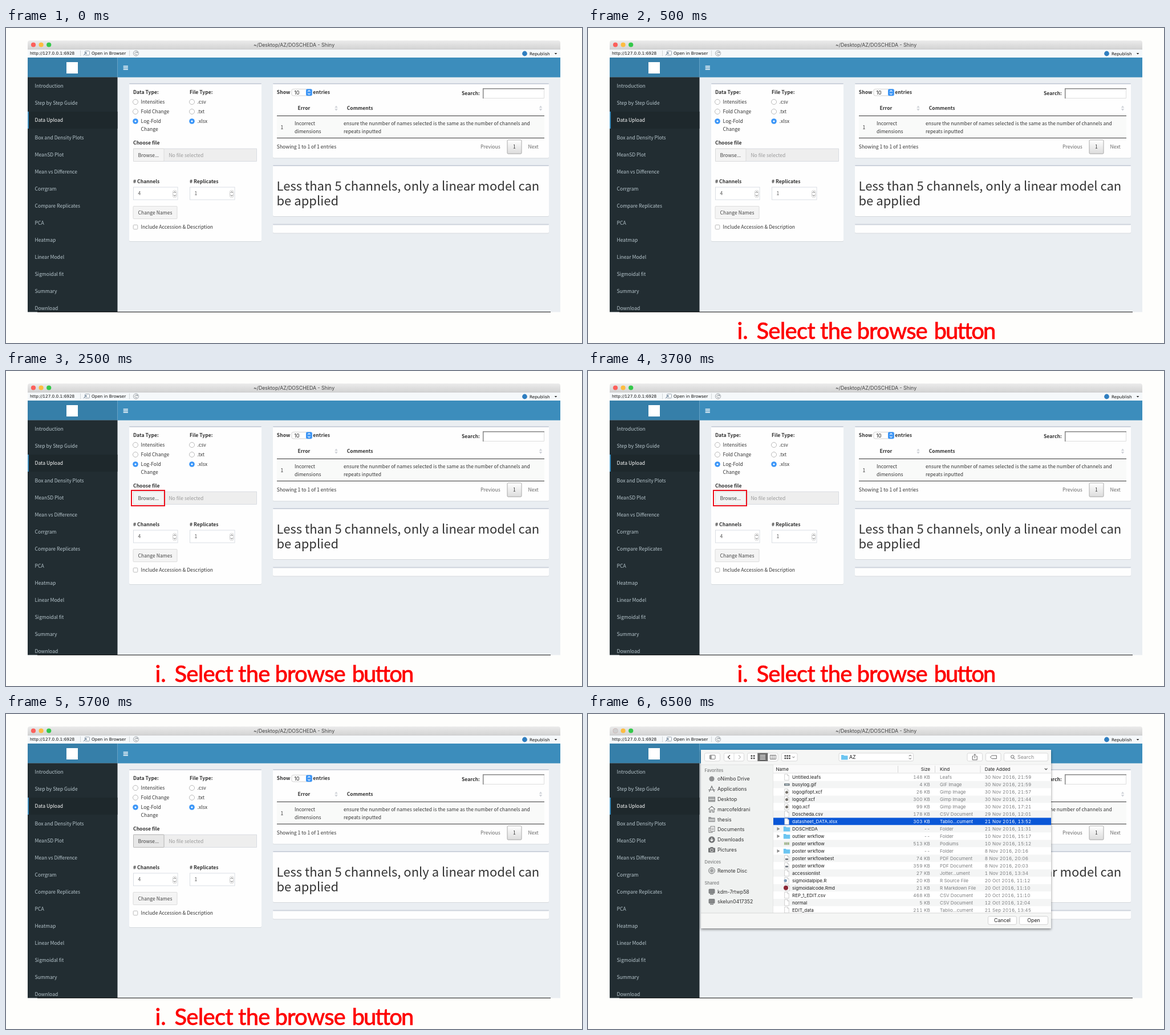
These frames come from a looping animation (1010 by 554 pixels, 8 s). An HTML page:

```html
<!DOCTYPE html>
<html lang="en">
<head>
<meta charset="utf-8">
<title>Data upload walkthrough</title>
<style>
  html, body { margin: 0; width: 100%; height: 100%; overflow: hidden; background: #fefefc; }
  svg { display: block; width: 1010px; height: 554px; }
  text { white-space: pre; }
  .page { font: 8.58px "Noto Sans CJK JP", "Noto Sans CJK SC", "Noto Sans CJK", sans-serif; fill: #333; }
  .bold { font-weight: 700; }
  .big { font-size: 22.04px; }
  .mac { font: 8.05px Inter, "Liberation Sans", sans-serif; fill: #1c1c1c; }
  .mid { font-size: 8.8px; }
  .group { font-size: 7.5px; font-weight: 500; fill: #7b7d7d; }
  .num { letter-spacing: .2px; font-variant-numeric: tabular-nums; }
  .bar { font: 7.3px "DejaVu Sans", sans-serif; fill: #111; }
  .caption { font: 500 40px Lato, sans-serif; fill: #fe0000; stroke: #fe0000; stroke-width: .5px; }
  .end { text-anchor: end; }
  .center { text-anchor: middle; }
</style>
</head>
<body>
<script>
const LOOP = 8000;

const rect = (x, y, w, h, fill, more = '') =>
  `<rect x="${x}" y="${y}" width="${w}" height="${h}" fill="${fill}" ${more}/>`;
const framed = (x, y, w, h, fill, line, r = 0) =>
  rect(x + .5, y + .5, w - 1, h - 1, fill, `stroke="${line}" stroke-width=".8" rx="${r}"`);
const circle = (x, y, r, fill, more = '') => `<circle cx="${x}" cy="${y}" r="${r}" fill="${fill}" ${more}/>`;
const fillPath = (d, fill) => `<path d="${d}" fill="${fill}"/>`;
const line = (d, color, width = 1) => `<path d="${d}" fill="none" stroke="${color}" stroke-width="${width}"/>`;
// y is the middle of the capitals
const text = (x, y, s, kind = 'page', fill = '') =>
  `<text x="${x}" y="${y}" dy=".365em" class="${kind}"${fill && ` style="fill:${fill}"`}>${s.replace(/&/g, '&amp;')}</text>`;
const bold = (x, y, s) => text(x, y, s, 'page bold');
const part = (id, body) => `<g id="${id}">${body}</g>`;

const arrows = (x, y, gap, color, w = 1) =>
  line(`M${x - 2} ${y - gap}l2 -2l2 2M${x - 2} ${y + gap}l2 2l2 -2`, color, w);

/* ---------- application window ---------- */

function titleBar() {
  const lights = ['#fc605b', '#fdbc40', '#34c84a'].map((c, i) => circle(48 + i * 13.6, 29.5, 4.1, c)).join('');
  return `<path d="M38 38V26q0-4 4-4H968q4 0 4 4V38z" fill="url(#chrome)"/>` +
    rect(38, 37, 934, 15.5, '#f5f8fa') + line('M38 37.3H972', '#b9b9b9', .7) + lights +
    text(505, 29.5, '~/Desktop/AZ/DOSCHEDA - Shiny', 'mac mid center', '#444') +
    `<g style="font-size:7.75px">${text(42, 44.5, 'http://127.0.0.1:6928', 'bar')}</g>` +
    line('M130.5 39.5V49.5M216.5 39.5V49.5', '#c9cdd0', .8) +
    framed(138, 40, 9, 8, '#fff', '#7d8c9a', 1) + line('M136 48l5-5m-3 0h3v3', '#5f7890', 1) +
    text(150, 44.5, 'Open in Browser', 'bar') +
    circle(228, 44.5, 4.6, '#fff', 'stroke="#8c949b" stroke-width=".9"') +
    line('M230.3 43.2a2.4 2.4 0 1 0 0 2.8M230.6 41.7v2h-2', '#7a858d', .9) +
    circle(909.5, 45, 4.4, '#2f7ec0') + text(918, 45, 'Republish', 'bar') +
    fillPath('M961.7 44h4.6l-2.3 2.6z', '#222');
}

function sideMenu() {
  const items = ['Introduction', 'Step by Step Guide', 'Data Upload', 'Box and Density Plots', 'MeanSD Plot',
    'Mean vs Difference', 'Corrgram', 'Compare Replicates', 'PCA', 'Heatmap', 'Linear Model',
    'Sigmoidal fit', 'Summary', 'Download'];
  return rect(38, 86.5, 157.5, 413, '#222d32') + rect(38, 147, 157.5, 30, '#1e282c') +
    rect(38, 147, 2, 30, '#3c8dbc') +
    `<g clip-path="url(#window)">` +
    items.map((s, i) => text(50.5, 102.2 + i * 30.06, s, 'page', i === 2 ? '#fff' : '#b8c7ce')).join('') + '</g>';
}

function header() {
  return rect(38, 52, 157.5, 34.7, '#367fa9') + rect(195.5, 52, 776.5, 34.7, '#3c8dbc') +
    rect(106, 60, 20, 20, '#fff') +
    line('M205.7 67.2h8.2M205.7 70h8.2M205.7 72.8h8.2', '#fff', 1.4);
}

const card = (x, y, w, h) =>
  rect(x, y + 1, w, h, '#d5d9dd', 'rx="2"') + rect(x, y, w, h, '#fefefe', 'rx="2"') +
  rect(x, y, w, 2, '#ccd2dc', 'rx="1"');

const radio = (x, y, on) => on
  ? circle(x, y, 4.8, '#3b96f8') + circle(x, y, 1.6, '#fff')
  : circle(x, y, 4.5, '#fff', 'stroke="#a9a9a9" stroke-width=".8"');

const numberBox = (x, w, value) =>
  framed(x, 279.5, w, 23, '#fff', '#d2d6de') + text(x + 8.6, 291.3, value, 'page', '#555') +
  framed(x + w - 9.5, 285, 7.5, 13.5, '#fff', '#c3c3c3', 3) + arrows(x + w - 5.7, 291.7, 1.9, '#444', .9);

function form() {
  const choice = (x, y, s, on) => radio(x, y, on) + text(x + 9.6, y, s);
  return card(216, 97, 232, 278) +
    bold(223, 113, 'Data Type:') + bold(322, 113, 'File Type:') +
    choice(227, 130, 'Intensities') + choice(227, 147, 'Fold Change') + choice(227, 164, 'Log-Fold', true) +
    text(236.6, 178, 'Change') +
    choice(326, 130, '.csv') + choice(326, 147, '.txt') + choice(326, 164, '.xlsx', true) +
    bold(223, 202, 'Choose file') +
    framed(223, 211.7, 217, 23.3, '#eeeeee', '#d2d6de') + text(285.4, 223.6, 'No file selected', 'page', '#999') +
    framed(223, 211.7, 54.5, 23.3, '#f4f4f4', '#d6d6d6', 1) +
    part('pressed', framed(223, 211.7, 54.5, 23.3, '#e7e7e7', '#adadad', 1)) +
    text(231.4, 223.6, 'Browse...', 'page', '#444') +
    bold(223, 269.5, '# Channels') + bold(322, 269.5, '# Replicates') +
    numberBox(223, 78.5, '4') + numberBox(322, 79.5, '1') +
    framed(222.5, 313, 78, 23, '#f4f4f4', '#d6d6d6', 1) + text(261.5, 324.8, 'Change Names', 'page center', '#444') +
    framed(222.7, 345.8, 8.6, 8.6, '#fff', '#a9a9a9', 1.5) + text(236.6, 350.2, 'Include Accession & Description');
}

function results() {
  const sort = x => fillPath(`M${x - 2.7} 140.3h5.4l-2.7-3.8zM${x - 2.7} 142h5.4l-2.7 3.8z`, '#d0d3d8');
  return card(468, 97, 484, 131.5) +
    bold(474.8, 113, 'Show') + framed(500.5, 107, 36.5, 12.5, '#fff', '#c6c6c6', 2.5) +
    rect(526, 107.2, 10.8, 12.1, '#3f97f6', 'rx="2.5"') + arrows(531.4, 113.3, 1.5, '#fff', 1.1) +
    text(505.5, 113.4, '10', 'mac mid') + bold(538.3, 113, 'entries') +
    bold(799, 115, 'Search:') + rect(836, 106, 108, 18, '#fff') +
    line('M836 123.5H943.5V106', '#dedede') + line('M836.7 124V106.8H944', '#858585', 1.5) +
    bold(511.5, 141, 'Error') + bold(597.7, 141, 'Comments') + sort(579) + sort(937.5) +
    rect(475, 155, 469, 38.5, '#f9faf9') + line('M475 154.5H944M475 193.5H944', '#222', .9) +
    text(481.5, 174.8, '1') + text(506, 168, 'Incorrect') + text(506, 181.7, 'dimensions') +
    text(592, 168, 'ensure the nunmber of names selected is the same as the number of channels and') +
    text(592, 181.7, 'repeats inputted') +
    text(474.8, 209, 'Showing 1 to 1 of 1 entries') +
    text(832, 209.3, 'Previous', 'page', '#666') + framed(878.5, 196.3, 26, 25.4, 'url(#button)', '#979797', 1.5) +
    text(891.5, 209.3, '1', 'page center') + text(915.5, 209.3, 'Next', 'page', '#666') +
    card(468, 241, 484, 90) +
    text(474.5, 277.6, 'Less than 5 channels, only a linear model can', 'page big') +
    text(474.5, 304.4, 'be applied', 'page big') +
    card(468, 344.5, 484, 16);
}

/* ---------- file dialog ---------- */

const folder = (x, y, fill) => fillPath(`M${x} ${y - 4}h4l1.2 1.3h6.3v7.2h-11.5z`, fill);

const sheet = (x, y) => `<path d="M${x - 3.8} ${y - 5.3}h5l2.6 2.6v8h-7.6z" fill="#fff" stroke="#b4b4b4" stroke-width=".6"/>` +
  line(`M${x + 1.2} ${y - 5.3}v2.6h2.6`, '#b4b4b4', .6);

const fileIcon = {
  doc: y => sheet(348.5, y),
  gif: y => rect(344, y - 2, 9.5, 4, '#68747a') + rect(345.5, y - .6, 6.5, 1.2, '#d5e3e8'),
  xcf: y => sheet(348.5, y) + circle(348.5, y + .5, 2.5, '#77736c'),
  dir: y => fillPath('M329.8 0v0z', 'none') + fillPath(`M331.5 ${y - 3}l5 3l-5 3z`, '#8b8b8b') + folder(342.8, y, '#6cc5f1'),
  deck: y => rect(343.5, y - 3.2, 10, 6.4, '#dfe6da') + rect(344.5, y - 2, 2, 4, '#8fae77') +
    rect(347.5, y - 2, 2, 4, '#9a9d8d') + rect(350.5, y - 2, 2, 4, '#8fae77'),
  pdf: y => sheet(348.5, y) + rect(346, y, 5, 3, '#7a8088'),
  r: y => sheet(348.5, y) + circle(346.2, y + .3, 2.7, '#7d9cbb'),
  rmd: y => sheet(349.5, y) + circle(347, y, 4, '#8b2635')
};

const files = [
  ['Untitled.leafs', '148 KB', 'Leafs', '30 Nov 2016, 21:59', 'doc'],
  ['busylog.gif', '4 KB', 'GIF Image', '30 Nov 2016, 21:59', 'gif'],
  ['logogifopt.xcf', '26 KB', 'Gimp Image', '30 Nov 2016, 21:57', 'xcf'],
  ['logogif.xcf', '300 KB', 'Gimp Image', '30 Nov 2016, 21:44', 'xcf'],
  ['logo.xcf', '99 KB', 'Gimp Image', '30 Nov 2016, 17:21', 'xcf'],
  ['Doscheda.csv', '178 KB', 'CSV Document', '29 Nov 2016, 12:01', 'doc'],
  ['datasheet_DATA.xlsx', '303 KB', 'Tablio...cument', '21 Nov 2016, 13:52', 'doc'],
  ['DOSCHEDA', '--', 'Folder', '21 Nov 2016, 11:31', 'dir'],
  ['outlier wrkflow', '--', 'Folder', '10 Nov 2016, 15:17', 'dir'],
  ['poster wrkflow', '513 KB', 'Podiums', '10 Nov 2016, 15:12', 'deck'],
  ['poster wrkflow', '--', 'Folder', '8 Nov 2016, 20:16', 'dir'],
  ['poster wrkflowbest', '74 KB', 'PDF Document', '8 Nov 2016, 20:06', 'pdf'],
  ['poster wrkflow', '359 KB', 'PDF Document', '8 Nov 2016, 20:03', 'pdf'],
  ['accessionlist', '27 KB', 'Jotter...ument', '1 Nov 2016, 13:34', 'doc'],
  ['sigmoidalpipe.R', '20 KB', 'R Source File', '20 Oct 2016, 11:12', 'r'],
  ['sigmoidalcode.Rmd', '21 KB', 'R Markdown File', '20 Oct 2016, 11:10', 'rmd'],
  ['REP_1_EDIT.csv', '468 KB', 'CSV Document', '20 Oct 2016, 11:10', 'doc'],
  ['normal', '5 KB', 'CSV Document', '12 Oct 2016, 12:04', 'doc'],
  ['EDIT_data', '211 KB', 'Micro'.slice(5) + 'Tablio...cument', '21 Sep 2016, 13:45', 'doc']
];

function fileList() {
  const rows = files.map(([name, size, kind, date, icon], i) => {
    const y = 111.2 + i * 12.97, picked = i === 6;
    const dark = picked ? '#fff' : '', soft = picked ? '#fff' : '#7d7f80';
    return rect(325, y - 6.5, 487, 13, picked ? '#0a57d7' : i % 2 ? '#f4f5f5' : '#fff') +
      fileIcon[icon](y) + text(358, y, name, 'mac', dark) + text(600, y, size, 'mac num end', soft) +
      text(617, y, kind, 'mac', soft) + text(695.7, y, date, 'mac num', soft);
  }).join('');
  return rect(325, 89.5, 487, 260.5, '#fff') + `<g clip-path="url(#list)">${rows}</g>` +
    rect(325, 89.5, 487, 14.5, '#fafafa') + line('M325 104H812', '#d4d4d4', .7) +
    line('M543.5 91V103M608.5 91V103M688 91V103', '#d0d0d0', .8) +
    text(329.5, 96.8, 'Name', 'mac') + text(600, 96.8, 'Size', 'mac end') +
    text(617, 96.8, 'Kind', 'mac') + text(695.7, 96.8, 'Date Added', 'mac') +
    line('M800.8 95.7l2.3 2.3l2.3-2.3', '#444', 1.1);
}

function places() {
  const g = '#737576', x = 217;
  const ring = (y, r) => circle(x, y, r, 'none', `stroke="${g}" stroke-width="1"`);
  const screen = y => framed(x - 5.5, y - 5, 11, 8.4, '#858788', g, 1) + rect(x - 3, y + 3.8, 6, 1.5, g);
  const list = [
    ['oNimbo Drive', 114, y => circle(x, y, 4.6, '#8d8f90')],
    ['Applications', 132, y => line(`M${x - 4.5} ${y + 5}l4.5-10l4.5 10M${x - 6} ${y + 1.5}h12`, g, 1.2)],
    ['Desktop', 150, y => framed(x - 6, y - 4.5, 12, 9, '#c3c5c5', g) + line(`M${x - 5} ${y - 2}h10M${x - 5} ${y + 2.5}h10`, g, .9)],
    ['marcofeldrani', 167.7, y => line(`M${x - 6} ${y}l6-5.3l6 5.3M${x - 4} ${y - 1}v6h2.5v-4h3v4h2.5v-6`, g, 1.1)],
    ['thesis', 185.3, y => folder(x - 5.8, y, '#8f9192') + rect(x - 4.8, y - 1, 9.6, 4, '#c9cbcb')],
    ['Documents', 203, y => framed(x - 5.5, y - 3, 7, 9, '#ddd', g) + framed(x - 2.5, y - 6, 8, 10, '#f0f0f0', g) + line(`M${x - .5} ${y - 2}h4m-4 2.5h4`, g, .8)],
    ['Downloads', 221, y => circle(x, y, 5.7, g) + line(`M${x} ${y - 3.2}v5.5m-2.4-2.3l2.4 2.5l2.4-2.5`, '#fff', 1.3)],
    ['Pictures', 239, y => rect(x - 6, y - 3.5, 12, 8, g, 'rx="1"') + rect(x - 2.5, y - 5, 5, 2, g) + circle(x, y + .5, 2.5, g, 'stroke="#eee" stroke-width=".9"')],
    ['Remote Disc', 275.5, y => ring(y, 5.4) + circle(x, y, 4.4, '#c6c8c8') + ring(y, 1.6)],
    ['kdm-7rtwp58', 312.5, screen],
    ['skelun0417352', 330, screen]
  ];
  return rect(198, 89.5, 127, 260.5, '#f0f2f1') + line('M325 89.5V350', '#d3d5d4', .8) +
    [['Favorites', 99], ['Devices', 260], ['Shared', 297]].map(([s, y]) => text(204.5, y, s, 'mac group')).join('') +
    list.map(([s, y, icon]) => icon(y) + text(227, y, s, 'mac mid', '#333')).join('');
}

function dialogTools() {
  const key = (x, w) => framed(x, 68.3, w, 15, '#fff', '#d0d0d0', 2.5);
  const g = '#555';
  const dots = (x, n, step) => Array.from({ length: n * 2 }, (_, i) =>
    rect(x + (i % n) * step, 72.3 + Math.floor(i / n) * 4.2, 2.7, 2.7, g)).join('');
  return key(204, 28) + framed(213, 71.8, 10.5, 8, '#fff', g, 1) + rect(213.5, 72.3, 3.3, 7, '#999') +
    key(238, 36) + line('M256 69V83', '#d0d0d0', .8) +
    line('M249 72.3l-3.5 3.5l3.5 3.5', '#333', 1.2) + line('M264 72.3l3.5 3.5l-3.5 3.5', '#bbb', 1.2) +
    key(279, 54.5) + dots(285.5, 2, 4.3) + rect(297.3, 68.6, 18, 14.4, '#6a6a6a') +
    line('M301.5 72.3h9.6m-9.6 2.4h9.6m-9.6 2.4h9.6m-9.6 2.4h9.6', '#fff', 1) +
    framed(319, 71.8, 11, 8, '#fff', g) + line('M322.8 72v7.5M326.2 72v7.5', g, .9) +
    key(339, 28.5) + dots(344.5, 3, 3.8) + line('M358.5 75l1.9 1.9l1.9-1.9', g) +
    key(439.5, 131.5) + folder(444, 76, '#6cc5f1') + text(458, 76, 'AZ', 'mac mid') + arrows(564.8, 75.8, 1.6, '#444') +
    key(664.5, 27.5) + line('M676 74.2h-1.8v6.5h8v-6.5h-1.8M678.2 78v-7.3m-2.1 2l2.1-2.1l2.1 2.1', g, .9) +
    key(697, 27.5) + `<path d="M705.3 75.8l3-2.8h8v5.6h-8z" fill="none" stroke="${g}" stroke-width=".9"/>` +
    key(729, 78) + circle(744.3, 75.2, 2.7, 'none', `stroke="${g}" stroke-width=".9"`) + line('M746.3 77.2l2.5 2.5', g) +
    text(753, 76, 'Search', 'mac mid', '#8a8a8a');
}

function dialog() {
  const button = (x, s) => framed(x, 355.3, 51, 15.5, '#fff', '#c8c8c8', 2.5) + text(x + 25.5, 363, s, 'mac mid center');
  return rect(44, 25.4, 8.2, 8.2, '#d0d0d0', 'rx="4.1" stroke="#bdbdbd" stroke-width=".6"') +
    rect(198, 63, 614, 314, '#f5f6f5', 'filter="url(#shadow)"') +
    dialogTools() + line('M198 89.3H812', '#cfcfcf', .8) + places() + fileList() +
    line('M198 350H812', '#d0d0d0', .8) + button(701, 'Cancel') + button(756, 'Open');
}

/* ---------- caption ---------- */

function caption() {
  const words = [['i.', 261.5, 0], ['Select', 295.5, -.8], ['the', 407, -.8], ['browse', 471.5, -.9], ['button', 606.5, -2]];
  return words.map(([s, x, gap]) => `<text class="caption" x="${x}" y="547" letter-spacing="${gap}">${s}</text>`).join('');
}

const gradient = (id, from, to) => `<linearGradient id="${id}" x2="0" y2="1"><stop stop-color="${from}"/>` +
  `<stop offset="1" stop-color="${to}"/></linearGradient>`;
const clip = (id, ...box) => `<clipPath id="${id}">${rect(...box, '#000')}</clipPath>`;

document.body.innerHTML = `<svg viewBox="0 0 1010 554" xmlns="http://www.w3.org/2000/svg"><defs>` +
  gradient('chrome', '#ebebeb', '#d2d2d2') + gradient('button', '#fff', '#dcdcdc') +
  clip('window', 38, 22, 934, 477) + clip('list', 325, 104, 487, 246) +
  `<filter id="shadow" x="-5%" y="-5%" width="110%" height="112%"><feDropShadow dx="0" dy="2" stdDeviation="2.2" flood-opacity=".45"/></filter></defs>` +
  rect(38, 52, 934, 447.5, '#eaeef2') + titleBar() + header() + sideMenu() + form() + results() +
  line('M55 499.5H955', '#1a1a1a', 1) +
  part('ring', rect(220, 210, 58, 27, 'none', 'stroke="#ec0d1b" stroke-width="2"')) +
  part('dialog', dialog()) + part('caption', caption()) + '</svg>';

// part, shown from, shown until (ms)
const steps = [
  ['caption', 500, 6500],
  ['ring', 2500, 4500],
  ['pressed', 4500, LOOP],
  ['dialog', 6500, LOOP]
];
for (const [id, from, to] of steps) {
  const frames = [[0, 0], [from, 1], [to, 0]].map(([at, opacity]) =>
    ({ offset: at / LOOP, opacity, easing: 'step-end' }));
  document.getElementById(id).animate(frames, { duration: LOOP, iterations: Infinity });
}
</script>
</body>
</html>
```
